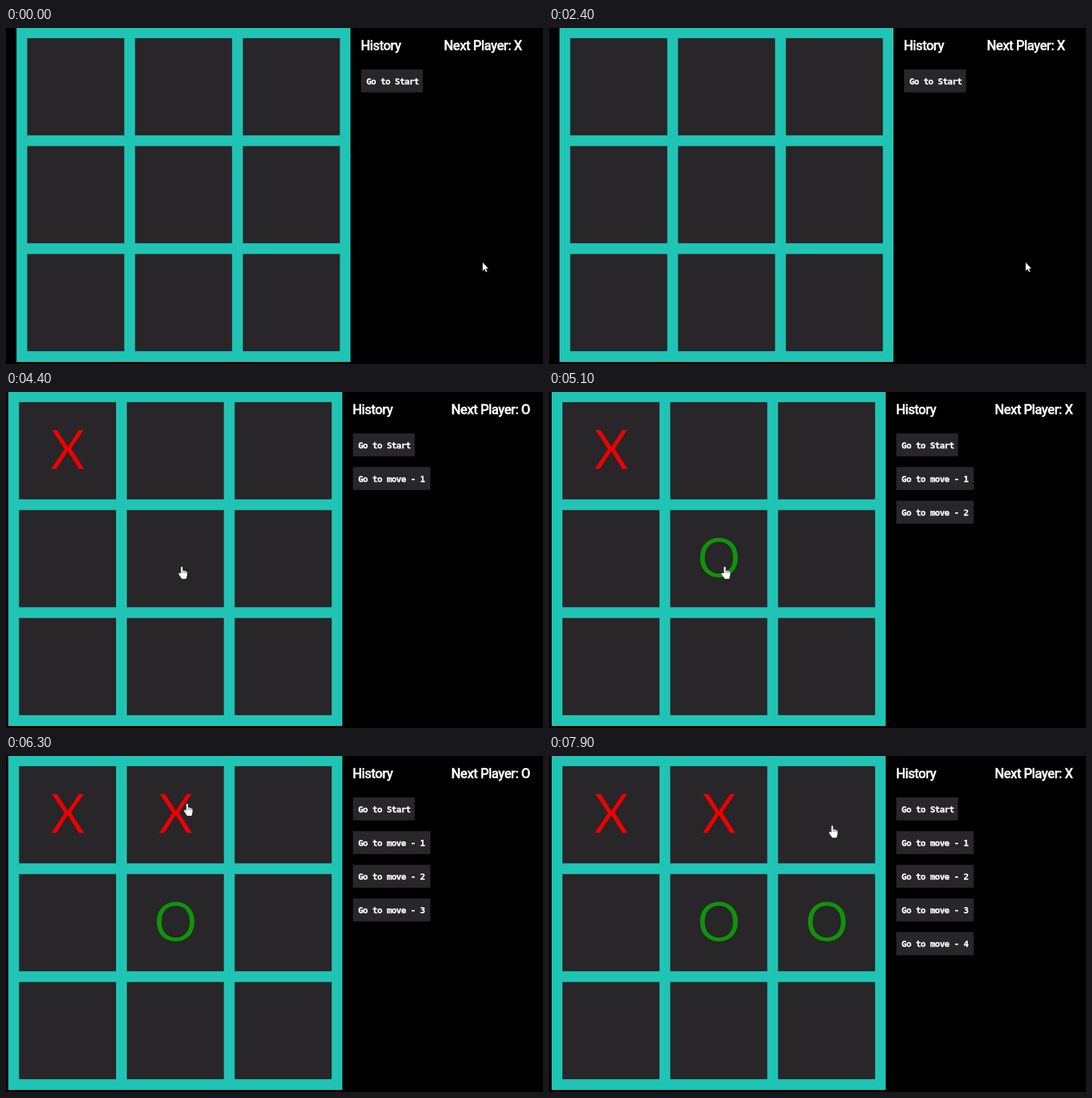
These frames come from a looping animation (800x500 px, 8 s). An HTML page:

```html
<!DOCTYPE html>
<html lang="en">
<head>
<meta charset="utf-8">
<title>Tic-tac-toe</title>
<style>
  html, body { margin: 0; width: 100%; height: 100%; overflow: hidden; background: #000; }
  svg { display: block; }
  .cell { fill: #282628; }
  .head { font: 500 20px Roboto, sans-serif; letter-spacing: -.66px; fill: #fff; stroke: #fff; stroke-width: .35px; }
  .label { font: 700 13px "DejaVu Sans Mono", monospace; letter-spacing: -.72px; fill: #fff; stroke: #fff; stroke-width: .3px; }
  .mark { font: 400 81px Lato, sans-serif; text-anchor: middle; stroke: #282628; stroke-width: 1px; }
</style>
</head>
<body>
<svg width="800" height="500" viewBox="0 0 800 500">
  <g id="left">
    <rect x="15.6" y="-1" width="497.6" height="498" fill="#20c4b5"/>
    <g id="board"></g>
    <text class="head" x="528.5" y="33">History</text>
    <g id="list"></g>
  </g>
  <text id="next" class="head" y="33"></text>
  <path id="arrow" d="M0 0V13.2L3 10.5L5 15L7.2 14L5.2 9.7H9Z" fill="#fff" stroke="#000" stroke-width=".5"/>
  <g id="hand">
    <path d="M-1.3 1.2a1.2 1.2 0 0 1 2.4 0V5.8Q2.6 5 3.7 6.2Q5.1 5.6 5.9 7Q7.6 6.6 7.8 8.6V12.8L6.4 18H0L-4 12.2Q-5.3 10.1 -4.2 9.2Q-3 8.8 -1.3 10.6Z" fill="#fff"/>
    <path d="M1.3 5.8V9.2M3.7 6.4V9.4M5.9 7.2V9.6" stroke="#282628" stroke-width=".7"/>
  </g>
</svg>
<script>
const LOOP = 8000, STEP = 100;
const X0 = 31.6, Y0 = 15.1, PITCH = 160.6, SIZE = 144.6;
const FIRST_CLICK = 3800, TURN = 1133, PAUSE = 250, TRAVEL = 350;

// Cells in order of play, and where the pointer rests in each
const cells = [0, 4, 1, 5];
const stops = [[710, 348.5], [133, 99.5], [262, 260], [270, 71], [424, 261], [422, 103.5]];

const clickTime = i => FIRST_CLICK + i * TURN;
const leaveTime = i => i ? clickTime(i - 1) + PAUSE : 2400;
const column = cell => X0 + (cell % 3) * PITCH;
const row = cell => Y0 + Math.floor(cell / 3) * PITCH;
const $ = id => document.getElementById(id);
const show = (el, on) => el.setAttribute("visibility", on ? "visible" : "hidden");

function add(parent, tag, attrs, text = "") {
  const el = document.createElementNS("http://www.w3.org/2000/svg", tag);
  for (const key in attrs) el.setAttribute(key, attrs[key]);
  el.textContent = text;
  return parent.appendChild(el);
}

for (let i = 0; i < 9; i++) {
  add($("board"), "rect", { class: "cell", width: SIZE, height: SIZE, x: column(i), y: row(i) });
}

const marks = cells.map((cell, i) => add($("board"), "text", {
  class: "mark", x: column(cell) + SIZE / 2 + .4, y: row(cell) + 100,
  fill: i % 2 ? "#0f940a" : "#ee0000"
}, i % 2 ? "O" : "X"));

const buttons = Array.from({ length: cells.length + 1 }, (_, i) => {
  const g = add($("list"), "g", { transform: `translate(529 ${61.5 + i * 50.15})` });
  add(g, "rect", { class: "cell", width: i ? 115.4 : 92, height: 34.3 });
  add(g, "text", { class: "label", x: 7.7, y: 22 }, i ? "Go to move - " + i : "Go to Start");
  return g;
});

function pointer(t) {
  let [x, y] = stops[0];
  stops.slice(1).forEach(([toX, toY], i) => {
    const u = Math.min(1, Math.max(0, (t - leaveTime(i)) / TRAVEL));
    const ease = u * u * (3 - 2 * u);
    x += (toX - x) * ease;
    y += (toY - y) * ease;
  });
  return [x, y];
}

const inside = (v, start) => v > start && v < start + 3 * PITCH && (v - start) % PITCH < SIZE;

function draw(t) {
  const count = cells.filter((_, i) => clickTime(i) <= t).length;
  const odd = count % 2;
  // The centred layout widens with the longer buttons and with the "O".
  const spread = count ? 11.6 : 0;
  const shift = -spread - odd * .6;
  $("left").setAttribute("transform", `translate(${shift} 0)`);
  $("next").textContent = "Next Player: " + (odd ? "O" : "X");
  $("next").setAttribute("x", 652.3 + spread - odd * .6);
  marks.forEach((m, i) => show(m, i < count));
  buttons.forEach((b, i) => show(b, i <= count));

  const [x, y] = pointer(t);
  const over = inside(x - shift, X0) && inside(y, Y0);
  for (const id of ["arrow", "hand"]) {
    $(id).setAttribute("transform", `translate(${x} ${y})`);
    show($(id), over === (id === "hand"));
  }
}

const begin = performance.now();
function tick() {
  const t = (performance.now() - begin) % LOOP;
  draw(Math.floor(t / STEP) * STEP);
  requestAnimationFrame(tick);
}
tick();
</script>
</body>
</html>
```
